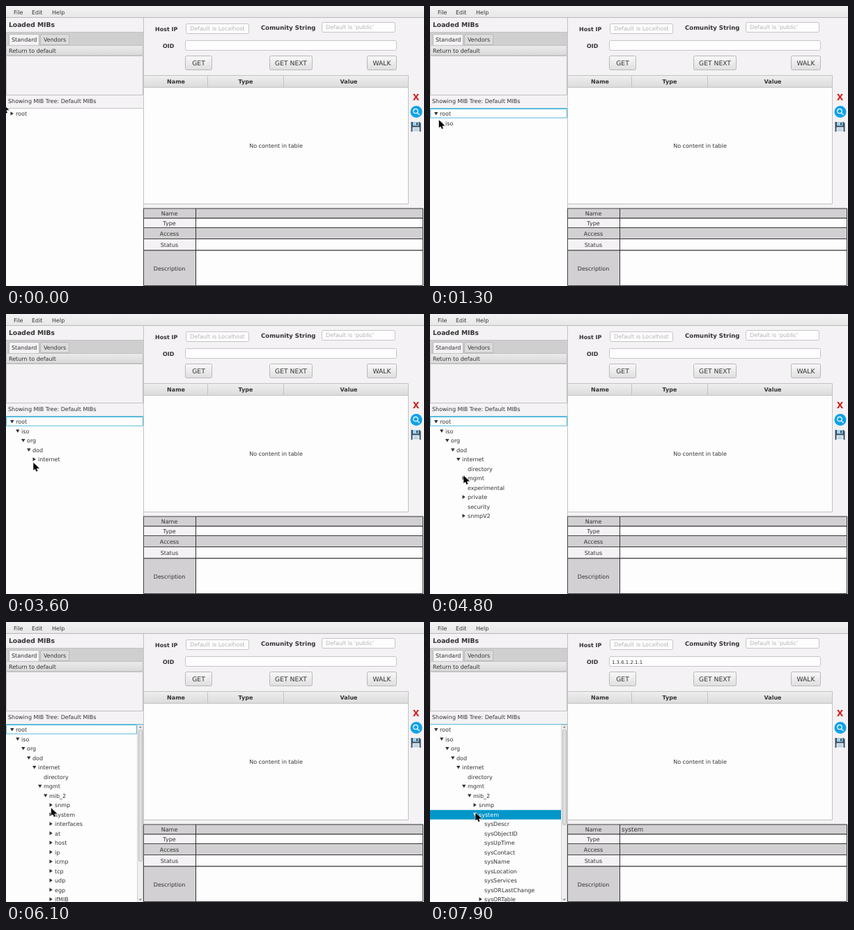
Animation of 600x401 px, one loop 8 s. Source, as an HTML page with a canvas:

```html
<!DOCTYPE html>
<html lang="en">
<head>
<meta charset="utf-8">
<title>MIB browser</title>
<style>
  html, body { margin: 0; width: 100%; height: 100%; overflow: hidden; }
  canvas { display: block; }
</style>
</head>
<body>
<canvas width="600" height="401"></canvas>
<script>
const ctx = document.querySelector('canvas').getContext('2d');
ctx.textRendering = 'geometricPrecision';
const LOOP = 8000, STEP = 100, SELECT_AT = 6900;
const INK = '#333', PANEL = '#f4f2f4', LINE = '#c3c2c3', FOCUS = '#58bcdb', WHITE = '#fefdfe';

// A node opens at the given time; without children it is a leaf.
const node = (name, opensAt, children) => ({ name, opensAt, children });
const leaf = name => node(name);
const closed = name => node(name, Infinity, []);
const system = node('system', 7500, [
  ...['sysDescr', 'sysObjectID', 'sysUpTime', 'sysContact', 'sysName',
    'sysLocation', 'sysServices', 'sysORLastChange'].map(leaf),
  closed('sysORTable')]);
const mib2 = node('mib_2', 5700, [
  closed('snmp'), system,
  ...['interfaces', 'at', 'host', 'ip', 'icmp', 'tcp', 'udp', 'egp', 'ifMIB'].map(closed)]);
const internet = node('internet', 3900, [
  leaf('directory'), node('mgmt', 5100, [mib2]), leaf('experimental'),
  closed('private'), leaf('security'), closed('snmpV2')]);
const root = node('root', 900, [
  node('iso', 1700, [node('org', 2200, [node('dod', 3200, [internet])])])]);

// Pointer path: time, x, y
const path = [
  [0, -5.5, 139], [600, 5, 151], [1000, 7, 153], [1300, 11.5, 161.5], [1500, 14, 165], [1600, 14, 165],
  [1900, 21, 178], [2100, 21, 178], [2300, 22, 181], [2400, 22, 181], [2800, 31, 188.5],
  [3300, 33, 197], [3600, 38, 211], [4100, 39, 212], [4200, 43, 217], [4400, 44, 218],
  [4800, 47, 229.5], [5000, 47, 230], [5400, 54, 246], [5700, 56, 249], [6100, 63.5, 264.5],
  [6200, 63.5, 265], [6400, 62, 267.5], [6600, 62.5, 267.5], [7200, 62.5, 267.5], [7500, 64, 271.5], [8000, 64, 271.5]];

function rect(x, y, w, h, fill, stroke, radius = 0) {
  ctx.beginPath();
  ctx.roundRect(x, y, w, h, radius);
  if (fill) { ctx.fillStyle = fill; ctx.fill(); }
  if (stroke) { ctx.strokeStyle = stroke; ctx.lineWidth = 1; ctx.stroke(); }
}

function shape(points, fill) {
  ctx.beginPath();
  points.forEach(([x, y]) => ctx.lineTo(x, y));
  ctx.closePath();
  ctx.fillStyle = fill;
  ctx.fill();
}

// y is the middle of the capitals
function text(str, x, y, { size = 8, bold = false, color = INK, align = 'left' } = {}) {
  ctx.font = `${bold ? 'bold ' : ''}${size}px "DejaVu Sans", sans-serif`;
  ctx.textAlign = align;
  ctx.fillStyle = color;
  ctx.fillText(str, x, y + size * 0.365);
}

function shade(y, h, top, bottom) {
  const g = ctx.createLinearGradient(0, y, 0, y + h);
  g.addColorStop(0, top);
  g.addColorStop(1, bottom);
  return g;
}

function button(label, x, w) {
  rect(x + .5, 71.5, w, 20, shade(72, 20, '#f8f8f8', '#dfdedf'), '#b9b8b9', 2);
  text(label, x + w / 2 + .5, 81.5, { size: 9.2, align: 'center' });
}

function field(x, y, w, hint) {
  rect(x + .5, y + .5, w, 14, WHITE, '#c6c5c6', 2);
  text(hint, x + 6, y + 7.5, { color: '#b4b3b4' });
}

function drawLeftPanel() {
  text('Loaded MIBs', 4, 27, { size: 9.2, bold: true });
  rect(0, 38, 197, 18, '#d0cfd0');
  rect(0, 37, 197, 1, LINE);
  rect(4.5, 40.5, 43, 17, PANEL, '#b9b8b9', [2, 2, 0, 0]);
  rect(49.5, 40.5, 41, 15, '#dddcdd', '#b9b8b9', [2, 2, 0, 0]);
  text('Standard', 8, 47.7);
  text('Vendors', 54, 47.7);
  rect(.5, 56.5, 196, 14, shade(57, 14, '#ebeaeb', '#dad9da'), LINE);
  text('Return to default', 4, 63.7);
  rect(.5, 71.5, 196, 56, PANEL, LINE);
  text('Showing MIB Tree: Default MIBs', 3, 136.2);
}

function drawQueryForm(selected) {
  text('Host IP', 214, 33, { bold: true });
  field(258, 25, 90, 'Default is Localhost');
  text('Comunity String', 366, 31, { size: 8.55, bold: true });
  field(453, 23, 105, "Default is 'public'");
  text('OID', 225, 57.5, { bold: true });
  field(257, 49, 303, '');
  if (selected) text('1.3.6.1.2.1.1', 261, 57, { size: 6.95 });
  button('GET', 257, 38);
  button('GET NEXT', 378, 61);
  button('WALK', 518, 42);
}

function drawResults() {
  rect(197.5, 99.5, 380, 184, WHITE, LINE);
  rect(198, 100, 379, 16, shade(100, 16, '#efeeef', '#dddcdd'));
  rect(198, 116, 379, 1, LINE);
  rect(289, 100, 1, 16, LINE);
  rect(398, 100, 1, 16, LINE);
  for (const [label, x] of [['Name', 244], ['Type', 344], ['Value', 492]])
    text(label, x, 108.5, { bold: true, align: 'center' });
  text('No content in table', 387.5, 200.2, { align: 'center' });
}

function drawTools() {
  text('X', 588.5, 130.5, { size: 12.5, bold: true, color: '#d3201c', align: 'center' });
  ctx.beginPath();
  ctx.arc(589, 151.5, 8.5, 0, 7);
  ctx.fillStyle = '#10a2ea';
  ctx.fill();
  ctx.beginPath();
  ctx.arc(588, 150.5, 3.2, 0, 7);
  ctx.moveTo(590.5, 153);
  ctx.lineTo(593.5, 156);
  ctx.strokeStyle = '#fff';
  ctx.lineWidth = 1.2;
  ctx.stroke();
  shape([[581.5, 166], [593.5, 166], [595.5, 168], [595.5, 180], [581.5, 180]], '#3b4f63');
  rect(584, 166, 8.5, 5.5, '#9ed2ee');
  rect(589, 167, 2, 3.5, '#3b4f63');
  rect(583.5, 173.5, 10, 6.5, '#e8f0f5');
  rect(585, 175.5, 7, 1, '#8fb6cf');
  rect(585, 177.7, 7, 1, '#8fb6cf');
}

function drawDetails(selected) {
  const rows = [['Name', 290, 304], ['Type', 304, 317.5], ['Access', 317.5, 333.5],
    ['Status', 333.5, 350], ['Description', 350, 400.5]];
  rows.forEach(([label, top, bottom], i) => {
    const grey = i % 2 === 0, h = bottom - top;
    rect(197.5, top, 75, h, grey ? '#d2d0d2' : PANEL, '#444');
    rect(272.5, top, 326, h, grey && i < 4 ? '#d2d0d2' : WHITE, '#333');
    text(label, 234.5, (top + bottom) / 2 + .4, { align: 'center' });
  });
  if (selected) text('system', 275, 297.3, { size: 8.6 });
}

function drawTree(time, selected) {
  const scrolls = time >= mib2.opensAt;
  const width = scrolls ? 188 : 197;
  rect(0, 147, 197, 254, WHITE);
  rect(0, 146, 197, 1, time >= root.opensAt ? FOCUS : LINE);
  if (time >= root.opensAt && !selected) rect(.5, 147.5, width - 1, 12.7, null, FOCUS);

  let y = 154;
  (function drawNode(item, depth) {
    const x = 14 + depth * 8, open = time >= item.opensAt;
    const lit = selected && item === system;
    const color = lit ? '#fff' : INK;
    if (lit) rect(0, y - 6.2, width, 13.5, '#0396c9');
    if (item.children) shape(open
      ? [[x - 8, y - 2], [x - 2.5, y - 2], [x - 5.25, y + 2.5]]
      : [[x - 7.5, y - 2.8], [x - 3.2, y], [x - 7.5, y + 2.8]], color);
    text(item.name, x, y + .3, { color });
    y += 13.5;
    if (open) item.children.forEach(child => drawNode(child, depth + 1));
  })(root, 0);

  if (scrolls) {
    const end = time >= system.opensAt ? 290 : 342;
    rect(188.5, 147.5, 8, 254, '#f0eff0', '#d6d5d6');
    rect(190.5, 154.5, 5, end - 154, '#e0dfe0', '#bab9ba', 2);
    shape([[190.5, 151.5], [195, 151.5], [192.75, 149]], '#888');
    shape([[190.5, 396.5], [195, 396.5], [192.75, 399]], '#888');
  }
}

function drawPointer(time) {
  const i = path.findIndex(key => key[0] > time);
  const [t0, x0, y0] = path[i - 1], [t1, x1, y1] = path[i];
  const k = (time - t0) / (t1 - t0);
  const x = x0 + (x1 - x0) * k, y = y0 + (y1 - y0) * k;
  const arrow = [[1, 1.3], [1, 13.3], [3.7, 11.2], [5.4, 15], [7.8, 13.8], [6.2, 10.5], [10.5, 10.2]];
  shape(arrow.map(([dx, dy]) => [x + dx, y + dy]), '#000');
  ctx.strokeStyle = '#fff';
  ctx.lineWidth = .6;
  ctx.stroke();
}

function draw(now) {
  const time = Math.floor(now % LOOP / STEP) * STEP;
  const selected = time >= SELECT_AT;
  rect(0, 0, 600, 401, PANEL);
  rect(0, 0, 600, 16, shade(0, 16, '#f3f2f3', '#e9e8e9'));
  rect(0, 16, 600, 1, '#bbbabb');
  text('File', 11, 9.2);
  text('Edit', 37, 9.2);
  text('Help', 66, 9.2);
  drawLeftPanel();
  drawTree(time, selected);
  rect(197, 17, 1, 384, LINE);
  drawQueryForm(selected);
  drawResults();
  drawTools();
  drawDetails(selected);
  drawPointer(time);
}

const start = performance.now();
(function tick() {
  draw(performance.now() - start);
  requestAnimationFrame(tick);
})();
</script>
</body>
</html>
```
